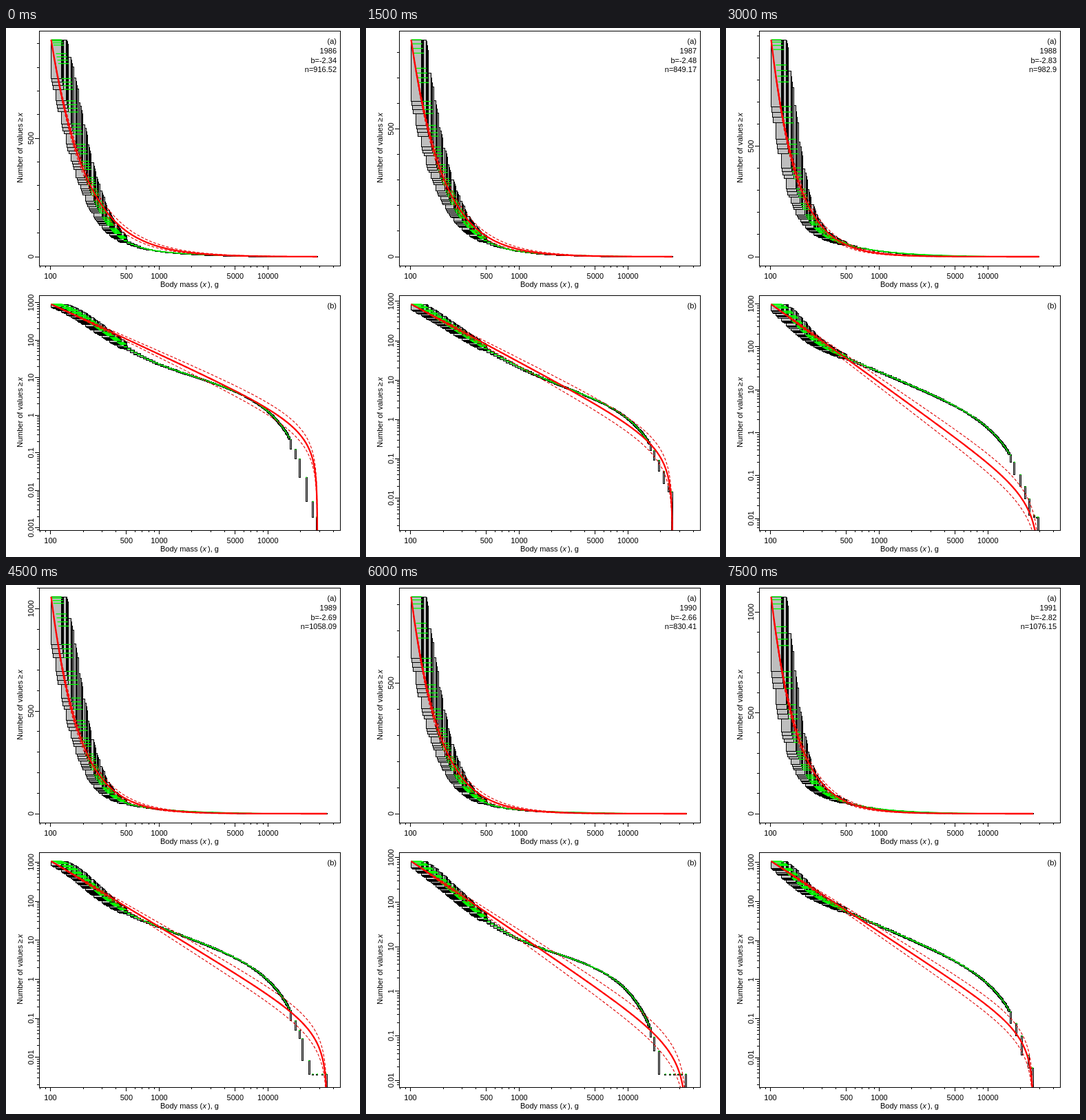
These frames come from a looping animation (514 px wide and 768 px high, 8000 ms). An HTML page with a canvas:

```html
<!DOCTYPE html>
<html lang="en">
<head>
<meta charset="utf-8">
<title>Body mass distributions by year</title>
<style>
  html, body { margin: 0; width: 100%; height: 100%; overflow: hidden; background: #fff; }
  canvas { display: block; width: 514px; height: 768px; }
</style>
</head>
<body>
<canvas id="stage" width="514" height="768"></canvas>
<script>
const ctx = document.getElementById('stage').getContext('2d');
const FONT = '11px "Liberation Sans", Arial, sans-serif';
const LOOP = 8000, HOLD = 1500, FIRST_YEAR = 1986;
const LEFT = 48, RIGHT = 485, START = 65.5, DECADE = 157.9;
const PANEL_A = { top: 4, bottom: 345 };
const PANEL_B = { top: 388, bottom: 729 };
const ZERO_Y = 332, SPAN_A = 315, TOP_B = 401, OFF = 800;

// b, n: fitted exponent and sample size; step: pixels per decade of count; end: last x.
// light: [slope, bend] of the small fish; heavy: [offset, slope, cutoff] of the large ones.
const years = [
  { b: -2.34, n: 916.52, step: 54.45, end: 452, light: [2.56, 1.45], heavy: [0.81, 0.85, 2.03] },
  { b: -2.48, n: 849.17, step: 57.1, end: 445, light: [2, 1.1], heavy: [1.03, 0.8, 2.06] },
  { b: -2.83, n: 982.9, step: 62.3, end: 454.5, light: [6.2, 1.5], heavy: [0.54, 1.05, 2.1] },
  { b: -2.69, n: 1058.09, step: 56.7, end: 466, light: [3.7, 1.5], heavy: [0.7, 1, 2.03] },
  { b: -2.66, n: 830.41, step: 64.7, end: 465.5, light: [2.5, 1.2], heavy: [1.2, 0.65, 1.99] },
  { b: -2.82, n: 1076.15, step: 56.7, end: 446, light: [6.6, 1.45], heavy: [0.48, 1.19, 2.07] }
];

const massX = m => 64.5 + DECADE * (Math.log10(m) - 2);
const crisp = v => Math.round(v - 0.5) + 0.5;
const random = seed => Math.abs(Math.sin(seed * 127.1) * 43758.5) % 1;

function line(x1, y1, x2, y2) {
  ctx.beginPath();
  ctx.moveTo(x1, y1);
  ctx.lineTo(x2, y2);
  ctx.stroke();
}

function text(str, x, y, align = 'left', italic = false) {
  ctx.font = (italic ? 'italic ' : '') + FONT;
  ctx.textAlign = align;
  ctx.fillText(str, x, y);
}

function upward(x, y, draw) {
  ctx.save();
  ctx.translate(x, y);
  ctx.rotate(-Math.PI / 2);
  draw();
  ctx.restore();
}

// Share of fish at or above x: a steep light group plus a heavy group that dies out.
function observed(x, { light: [slope, bend], heavy: [offset, fall, cutoff] }) {
  const u = Math.max(0, x - START) / DECADE;
  const small = (1 - 10 ** -offset) * 10 ** (-slope * u ** bend);
  const large = 10 ** (-offset - fall * u) * Math.exp(-(10 ** (2 * (u - cutoff))));
  return small + large;
}

function makeBins(year, seed) {
  const level = x => Math.min(710, TOP_B - year.step * Math.log10(observed(x, year)));
  const bins = [];

  // Length bins one unit wide, turned into mass, so they narrow to the right.
  const addSpecies = (unit, from, to) => {
    const edge = n => START + 3 * DECADE * Math.log10(n / unit);
    for (let n = Math.ceil(unit); edge(n + 1) < to; n++) {
      const x = edge(n), w = edge(n + 1) - x;
      if (x >= from) bins.push({ x, w, high: level(x - w / 2), mid: level(x), low: level(x + w) });
    }
  };
  for (let s = 0; s < 8; s++) addSpecies(13 - 0.43 * (s % 2) - 0.07 * (s >> 1), START, 175);
  for (let s = 0; s < 2; s++) addSpecies(24 + s / 2, 165, 412);

  // A few single large fish, the last one reaching down to zero.
  for (let x = 412, next; x < year.end - 1; x = next) {
    next = Math.min(x + 4 + 6 * random(x + seed), year.end - 2);
    const last = next <= x;
    if (last) next = year.end;
    bins.push({ x, w: 2, high: level(x), mid: level(x), low: last ? OFF : level(next) });
  }
  return bins.sort((a, b) => b.x - a.x);
}

function drawBins(bins, toY) {
  ctx.lineWidth = 1;
  ctx.strokeStyle = '#000';
  ctx.fillStyle = '#bebebe';
  for (const b of bins) {
    const x = crisp(b.x), y = crisp(toY(b.high));
    const w = Math.max(2, Math.round(b.w)), h = Math.max(1, crisp(toY(b.low)) - y);
    ctx.fillRect(x, y, w, h);
    ctx.strokeRect(x, y, w, h);
  }
  ctx.strokeStyle = '#0f0';
  ctx.lineWidth = 1.3;
  for (const b of bins) line(b.x, toY(b.mid), b.x + b.w, toY(b.mid));
}

// Bounded power law, as a share of all values.
function fitted(x, slope, end) {
  const floor = 10 ** (slope * (end - START) / DECADE);
  return Math.max(0, (10 ** (slope * (x - START) / DECADE) - floor) / (1 - floor));
}

function drawFit(slope, end, toY) {
  ctx.beginPath();
  for (let x = START; x < end; x += x > end - 6 ? 0.1 : 1) ctx.lineTo(x, toY(fitted(x, slope, end)));
  ctx.lineTo(end, toY(0));
  ctx.stroke();
}

function drawFits({ b, n, end }, toY) {
  const slope = b + 1, margin = 1.96 * Math.abs(slope) / Math.sqrt(n);
  ctx.strokeStyle = '#e00000';
  ctx.lineWidth = 1.1;
  ctx.setLineDash([4, 2.5]);
  drawFit(slope - margin, end, toY);
  drawFit(slope + margin, end, toY);
  ctx.setLineDash([]);
  ctx.strokeStyle = '#f00';
  ctx.lineWidth = 2.3;
  drawFit(slope, end, toY);
}

function clipped({ top, bottom }, draw) {
  ctx.save();
  ctx.beginPath();
  ctx.rect(LEFT, top, RIGHT - LEFT, bottom - top);
  ctx.clip();
  draw();
  ctx.restore();
}

function yTick(y, major, label = '') {
  line(major ? 42 : 45, crisp(y), LEFT, crisp(y));
  upward(39.5, y, () => text(label, 0, 0, 'center'));
}

function drawFrame({ top, bottom }) {
  ctx.strokeStyle = ctx.fillStyle = '#000';
  ctx.lineWidth = 1;
  ctx.strokeRect(LEFT + 0.5, top + 0.5, RIGHT - LEFT, bottom - top);
  for (let p = 10; p <= 10000; p *= 10) {
    for (let k = 1; k < 10; k++) {
      const m = k * p, x = massX(m);
      if (x < LEFT || x > RIGHT) continue;
      const major = k === 1 || (k === 5 && p < 10000);
      line(crisp(x), bottom, crisp(x), bottom + (major ? 6 : 3));
      if (major) text(m, x, bottom + 19, 'center');
    }
  }
  text('Body mass (', 224, bottom + 31);
  text('x', 285.5, bottom + 31, 'left', true);
  text('), g', 293, bottom + 31);
  upward(24, bottom - 120, () => {
    text('Number of values', 0, 0);
    text('≥', 88.5, 0);
    text('x', 96.5, 0, 'left', true);
  });
}

function drawLinearPanel(year, bins, index) {
  const toY = part => ZERO_Y - SPAN_A * part;
  clipped(PANEL_A, () => {
    drawBins(bins, y => y >= OFF ? ZERO_Y : toY(10 ** ((TOP_B - y) / year.step)));
    drawFits(year, toY);
  });
  drawFrame(PANEL_A);
  for (let v = 0; toY(v / year.n) > PANEL_A.top; v += 100) {
    const major = v % 500 === 0 && v <= year.n;
    yTick(toY(v / year.n), major, major ? v : '');
  }
  ['(a)', FIRST_YEAR + index, 'b=' + year.b, 'n=' + year.n]
    .forEach((str, i) => text(str, 480, 23 + 13.8 * i, 'right'));
}

function drawLogPanel(year, bins) {
  const toY = part => part > 0 ? Math.min(OFF, TOP_B - year.step * Math.log10(part)) : OFF;
  clipped(PANEL_B, () => {
    drawBins(bins, y => y);
    drawFits(year, toY);
  });
  drawFrame(PANEL_B);
  for (let e = -4; e <= 3; e++) {
    for (let k = 1; k < 10; k++) {
      const y = toY(k * 10 ** e / year.n);
      if (y < PANEL_B.top || y > PANEL_B.bottom) continue;
      yTick(y, k === 1, k === 1 ? (10 ** e).toFixed(Math.max(0, -e)) : '');
    }
  }
  text('(b)', 480, 407, 'right');
}

function render(index) {
  const year = years[index], bins = makeBins(year, index);
  ctx.fillStyle = '#fff';
  ctx.fillRect(0, 0, 514, 768);
  drawLinearPanel(year, bins, index);
  drawLogPanel(year, bins);
}

let shown = -1;
function tick() {
  const index = Math.floor(performance.now() % LOOP / HOLD);
  if (index !== shown) render(shown = index);
  requestAnimationFrame(tick);
}
tick();
</script>
</body>
</html>
```
